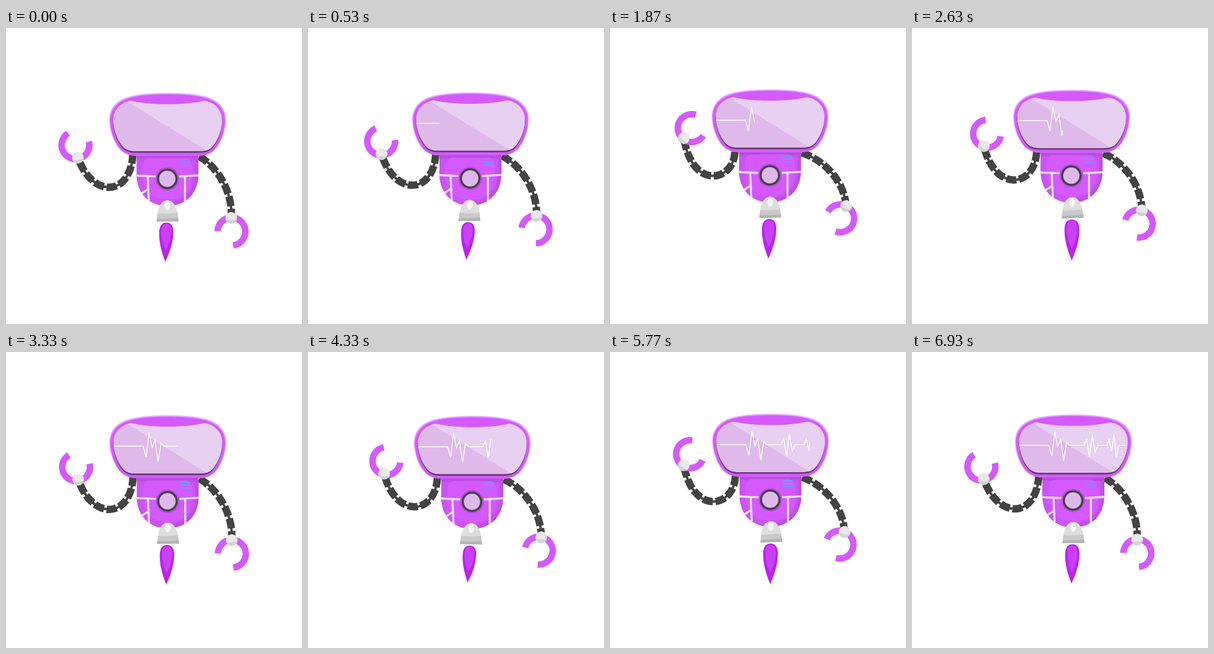
These frames come from a looping animation (500x500 px, 7 s). An HTML page:

```html
<!DOCTYPE html>
<html lang="en">
<head>
<meta charset="utf-8">
<title>Hovering robot</title>
<style>
html, body { margin: 0; width: 100%; height: 100%; overflow: hidden; background: #fff; }
svg { display: block; width: 100vw; height: 100vh; }
.links, .wire, .claw, .seams, #pulse { fill: none; }
.links { stroke: #434343; stroke-width: 12.5; stroke-dasharray: 17 4.5; }
.wire { stroke: #434343; stroke-width: 4; }
.claw { stroke: #d45aff; stroke-width: 11; }
.seams { stroke: #f1e2f7; stroke-width: 3.4; }
.lights { stroke: #45b4ff; stroke-width: 1.8; }
#pulse { stroke: #fff; stroke-width: 1.5; stroke-dasharray: 1 2; }
</style>
</head>
<body>
<svg viewBox="0 0 500 500">
  <defs>
    <path id="shell" d="M0-145C46-145 72-140 85-129C96-120 99-108 98.500-98C98-82 92-66 86-57C79-45 68-39 52-39H-52C-68-39-79-45-86-57C-92-66-98-82-98.500-98C-99-108-96-120-85-129C-72-140-46-145 0-145Z"/>
    <path id="glass" d="M0-126C25-126 45-128 62-132C80-129 92-117 92-98C92-85 86-68 80-60C74-50 66-46.500 56-46.500H-56C-66-46.500-74-50-80-60C-86-68-92-85-92-98C-92-117-80-129-62-132C-45-128-25-126 0-126Z"/>
    <path id="torso" d="M-52-42V-8C-52 25-30 46 .5 46C31 46 53 25 53-8V-42Z"/>
    <path id="bell" d="M0 36C9 36 15 45 17 58L18.700 72H-18.500L-17 58C-15 45-9 36 0 36Z"/>
    <clipPath id="inGlass"><use href="#glass"/></clipPath>
    <clipPath id="inTorso"><use href="#torso"/></clipPath>
    <clipPath id="inNozzle"><use href="#bell"/></clipPath>
    <clipPath id="inJoint"><circle r="10"/></clipPath>
    <g id="joint" clip-path="url(#inJoint)">
      <circle r="10" fill="#e8e8e8"/>
      <path fill="#d3d3d3" d="M-11 3Q0 6 11 1V11H-11Z"/>
    </g>
  </defs>

  <g id="robot">
    <g id="flame">
      <path fill="#bc22f0" d="M0 0C8 0 12 6 12 17C12 36 5 54 0 66C-5 54-12 36-12 17C-12 6-8 0 0 0Z"/>
      <path fill="#c940f8" d="M0 2C6 2 8.500 7 8.500 15C8.500 28 4 40 0 47C-4 40-8.500 28-8.500 15C-8.500 7-6 2 0 2Z"/>
    </g>

    <g id="armL"><path class="wire"/><path class="links"/></g>
    <g id="armR"><path class="wire"/><path class="links"/></g>
    <g id="handL"><path class="claw"/><use href="#joint"/></g>
    <g id="handR"><path class="claw"/><use href="#joint"/></g>

    <g clip-path="url(#inTorso)">
      <use href="#torso" fill="#bd4fe3"/>
      <path fill="#cb54f4" d="M-53-33H47V-8C47 22 25 40-4 41L-14 50H-60Z"/>
      <path fill="#d45aff" d="M-42-18Q-42-36-24-36H26Q42-36 42-18V-6C42 22 24 36 0 36C-24 36-42 20-42-6Z"/>
      <path fill="#b94cdf" d="M-53-43H54V-35H-53Z"/>
      <path class="seams" d="M-53-5.500L-19-4M-33-4L-31 42M-44 25L-32 17M20-4L54-6M30-4V42"/>
    </g>
    <g class="lights">
      <path d="M21.500-32H38"/>
      <path d="M21.500-27.300H38"/>
      <path d="M21.500-22.600H38"/>
    </g>
    <circle r="20" fill="#c04ce8"/>
    <circle r="17.400" fill="#434343"/>
    <circle r="13.800" fill="#deb8ea"/>

    <g id="nozzle" clip-path="url(#inNozzle)">
      <use href="#bell" fill="#dedede"/>
      <path fill="#c9c9c9" d="M-20 58Q0 60 20 57V73H-20Z"/>
      <path fill="#b4b4b4" d="M-20 67Q0 68 20 66V73H-20Z"/>
      <ellipse cy="45" rx="4.700" ry="7.800" fill="#f4f4f4"/>
    </g>

    <g transform="translate(.5)">
      <use href="#shell" fill="#e6a4ff"/>
      <use href="#shell" fill="#d45aff" transform="translate(0 -.9) scale(.983 .978)"/>
      <use href="#glass" fill="#633b70" transform="translate(0 2.500)"/>
      <g clip-path="url(#inGlass)">
        <use href="#glass" fill="#deb9ea"/>
        <path fill="#e8d0f2" d="M-72-133L72-44H100V-140Z"/>
      </g>
    </g>
    <polyline id="pulse" pathLength="1"/>
  </g>
</svg>
<script>
const LOOP = 7000, WAVE = 3500, PEAK = 0.52, TAU = 2 * Math.PI;
const $ = s => document.querySelector(s);
const $$ = s => document.querySelectorAll(s);
const place = (el, value) => el.setAttribute("transform", value);

// Shoulder, two handles and wrist, with the arm lowered and raised.
const arms = [
  { id: "L", low: [-58, -43, -61, 31, -127, 33, -151, -36], high: [-59, -40, -60, 10, -131, 27, -145, -63],
    turn: 49, claw: [-4, -21, -15, 238] },
  { id: "R", low: [54, -38, 87, -19, 111, 25, 108, 66], high: [54, -38, 92, -26, 126, 10, 129, 52],
    turn: 27, claw: [0.5, 23, 181, 443] }
];

// Heartbeats: start, step between spikes, spike heights.
const beats = [
  { x: -41, step: 5, spikes: [18, -23, 2, -10, 26, -5] },
  { x: 18, step: 4.8, spikes: [-10, 19, -18, 11] },
  { x: 57, step: 4, spikes: [-10, 10, -19, 20] }
];

function arc(cx, cy, from, to, r = 23.5) {
  const p = deg => {
    const a = deg * TAU / 360;
    return `${cx + r * Math.cos(a)} ${cy + r * Math.sin(a)}`;
  };
  return `M${p(from)}A${r} ${r} 0 1 1 ${p(to)}`;
}

function pulseLine(base = -93) {
  const points = beats.flatMap(({ x, step, spikes }) =>
    [0, ...spikes, 0].map((h, i) => [x + i * step, base + h]));
  return [[-91, base], ...points, [92, base]].join(" ");
}

const robot = $("#robot"), flame = $("#flame"), nozzle = $("#nozzle"), pulse = $("#pulse");
const lights = $$(".lights path");
pulse.setAttribute("points", pulseLine());
for (const a of arms) {
  a.paths = $$(`#arm${a.id} path`);
  a.hand = $(`#hand${a.id}`);
  a.hand.querySelector(".claw").setAttribute("d", arc(...a.claw));
}

// Cosine that peaks at the given time.
const swell = (t, peak, period) => Math.cos(TAU * (t - peak) / period);

function draw(t) {
  // The hover rises slowly through the loop and drops back at its end.
  const x = 272.5 + 3 * swell(t, 750, WAVE) - 1.6 * swell(t, 1200, LOOP);
  const y = 253.2 - 4 * t / LOOP + 1.9 * swell(t, 350, WAVE) - 1.6 * swell(t, 1800, LOOP);
  place(robot, `translate(${x} ${y})`);

  const p = t % WAVE / WAVE;
  const half = p < PEAK ? p / PEAK : (1 - p) / (1 - PEAK);
  const lift = (1 - Math.cos(Math.PI * half)) / 2;
  for (const a of arms) {
    const c = a.low.map((v, i) => v + (a.high[i] - v) * lift);
    const d = `M${c[0]} ${c[1]}C${c.slice(2).join(" ")}`;
    a.paths.forEach(el => el.setAttribute("d", d));
    place(a.hand, `translate(${c[6]} ${c[7]}) rotate(${a.turn * lift})`);
  }

  const swing = Math.sin(TAU * p), sway = 0.3 - 1.6 * swing;
  place(nozzle, `rotate(${-sway})`);
  place(flame, `translate(${-1.5 + 1.4 * sway} 74) rotate(${2.2 - sway}) scale(${1 - 0.05 * swing})`);

  lights.forEach((el, i) =>
    el.setAttribute("opacity", 0.7 - 0.3 * Math.cos(TAU * (3 * t / LOOP + (i - 1) * 0.1))));
  pulse.setAttribute("stroke-dashoffset", 1 - t / LOOP);
}

const start = performance.now();
function tick() {
  draw((performance.now() - start) % LOOP);
  requestAnimationFrame(tick);
}
tick();
</script>
</body>
</html>
```
